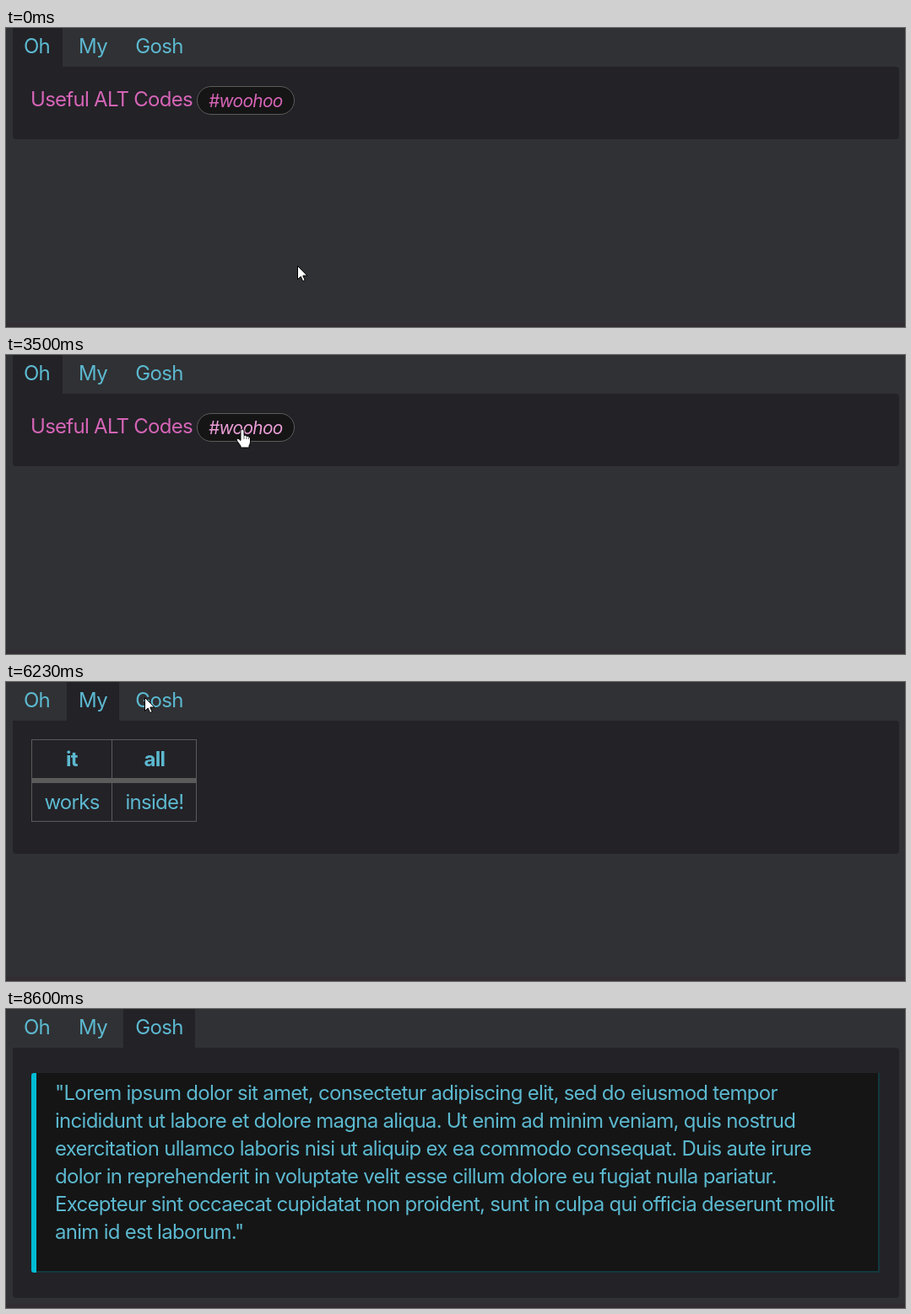
Animation of 1065x355 px, one loop 9.16 s. Source, as an HTML page:

```html
<!DOCTYPE html>
<html lang="en">
<head>
<meta charset="utf-8">
<title>Tabs demo</title>
<style>
  :root {
    --page: #303134; --panel: #232227; --ink: #5cb9d0; --link: #d665b7;
    --lit: #eb9fd8; --line: #5b5b5b; --dark: #151515;
  }
  html, body { margin: 0; width: 100%; height: 100%; overflow: hidden; background: var(--page); }
  body {
    position: relative; color: var(--ink);
    font: 400 24px/33px Inter, "Liberation Sans", sans-serif;
    letter-spacing: -.03em; font-optical-sizing: none; white-space: nowrap;
  }
  body * { box-sizing: border-box; }
  .box, .text, .tab, .scene, .popup, .cursor, .cursor svg { position: absolute; }
  .scene { inset: 0; }
  .strip { left: 0; right: 0; top: 350px; bottom: 0; background: #322c33; }

  .tab { top: 5px; text-align: center; }
  .active { top: 0; height: 47px; background: var(--panel); }
  .oh { left: 8px; width: 59px; }
  .tab.oh { left: 7px; }
  .my { left: 72px; width: 62px; }
  .gosh { left: 139px; width: 85px; }
  .panel { left: 8px; width: 1050px; top: 46px; background: var(--panel); border-radius: 0 4px 4px 4px; }

  .link { left: 29px; top: 68px; color: var(--link); }
  .tag {
    left: 226px; top: 69px; width: 116px; height: 34px; padding-left: 13px;
    border: 1px solid var(--line); border-radius: 17px; background: var(--dark);
    color: var(--link); font-size: 20.8px; font-style: italic; letter-spacing: -.03em;
  }
  .hover { color: var(--lit); }

  .grid { left: 30px; top: 68px; width: 196px; height: 98px; border: 1px solid var(--line); }
  .rule { left: 30px; top: 114px; width: 196px; height: 6px; background: var(--line); }
  .split { left: 125px; top: 68px; width: 1px; height: 98px; background: var(--line); }
  .cell { text-align: center; }
  .a { left: 30px; width: 96px; }
  .b { left: 126px; width: 100px; }
  .head { top: 75px; font-weight: 700; }
  .data { top: 126px; }

  .quote {
    left: 30px; top: 76px; width: 1005px; height: 237px; background: var(--dark);
    border: solid #12383d; border-width: 0 2px 2px 0; border-radius: 4px 0 0 4px;
  }
  .bar { left: 30px; top: 76px; width: 6px; height: 237px; background: #00bcd4; border-radius: 3px 0 0 3px; }

  .popup {
    left: 137px; top: 128px; width: 600px; height: 420px; overflow: hidden;
    background: var(--page); border: 1px solid var(--line); border-radius: 8px;
    box-shadow: 0 6px 25px rgba(0, 0, 0, .22);
  }
  .popup .text { left: 60px; }
  .title { top: 30px; font-weight: 700; font-size: 42px; line-height: 51px; letter-spacing: -.046em; color: #c5c700; }
  .thumb { left: 569px; top: 1px; width: 15px; height: 136px; border-radius: 8px; background: var(--line); }

  .cursor { left: 0; top: 0; }
  .cursor svg { left: 0; top: 0; width: 1px; height: 1px; overflow: visible; }
  .cursor path { fill: #fff; stroke: #000; stroke-width: 1; stroke-linejoin: round; }
</style>
</head>
<body>
  <div class="box strip"></div>

  <section class="scene">
    <div class="box active oh"></div>
    <div class="box panel" style="height:86px"></div>
    <div class="text link">Useful ALT Codes</div>
    <div class="box tag">#woohoo</div>
  </section>

  <section class="scene" hidden>
    <div class="box active my"></div>
    <div class="box panel" style="height:158px"></div>
    <div class="box grid"></div>
    <div class="box split"></div>
    <div class="box rule"></div>
    <div class="text cell head a">it</div>
    <div class="text cell head b">all</div>
    <div class="text cell data a">works</div>
    <div class="text cell data b">inside!</div>
  </section>

  <section class="scene" hidden>
    <div class="box active gosh"></div>
    <div class="box panel" style="height:297px"></div>
    <div class="box quote"></div>
    <div class="box bar"></div>
    <div class="text" style="left:58px;top:83px">
      "Lorem ipsum dolor sit amet, consectetur adipiscing elit, sed do eiusmod tempor<br>
      incididunt ut labore et dolore magna aliqua. Ut enim ad minim veniam, quis nostrud<br>
      exercitation ullamco laboris nisi ut aliquip ex ea commodo consequat. Duis aute irure<br>
      dolor in reprehenderit in voluptate velit esse cillum dolore eu fugiat nulla pariatur.<br>
      Excepteur sint occaecat cupidatat non proident, sunt in culpa qui officia deserunt mollit<br>
      anim id est laborum."
    </div>
  </section>

  <div class="tab oh">Oh</div>
  <div class="tab my">My</div>
  <div class="tab gosh">Gosh</div>

  <div class="popup">
    <div class="text title">Useful ALT Codes</div>
    <div class="text" style="top:105px">
      Symbols and typography that can be input<br>
      using the ALT code paradigm. Entry is<br>
      performed through a combination of holding<br>
      Left ALT on the keyboard, then entering a
    </div>
    <div class="box thumb"></div>
  </div>

  <div class="cursor">
    <svg class="arrow"><path d="M.5 .5V16.5L4.2 13L6.7 18.6L9.2 17.5L6.8 12H11.8Z"/></svg>
    <svg class="hand">
      <path d="M-2 2a2 2 0 0 1 4 0V7.5q2-.8 3 .8q2-.6 2.6 1q1.9-.3 1.9 1.7V15q0 2.5-1.5 4.5V22H-2V20L-6.3 14q-1.2-2 .6-2.8q1.5-.3 3.7 2.3Z"/>
      <path d="M2 8v4M5 9v3M7.5 10v2" style="stroke-width:.6"/>
    </svg>
  </div>

<script>
  const LOOP = 9160;
  const $ = selector => document.querySelector(selector);
  const scenes = document.querySelectorAll('.scene');
  const [link, tag, popup, cursor, arrow, hand] =
    ['.link', '.tag', '.popup', '.cursor', '.arrow', '.hand'].map($);

  const progress = (t, from, to) => Math.min(1, Math.max(0, (t - from) / (to - from)));
  const smooth = k => k * k * (3 - 2 * k);
  const within = (x, y, left, top, right, bottom) => x >= left && x < right && y >= top && y < bottom;

  const start = { x: 345, y: 282 };
  // Where the pointer goes; sway bends the way there into an S.
  const glides = [
    { from: 330, to: 1000, x: 146, y: 85 },
    { from: 1270, to: 1630, x: 160, y: 162 },
    { from: 2130, to: 2330, x: 83, y: 171 },
    { from: 2370, to: 2930, x: 280, y: 88, sway: 70 },
    { from: 3500, to: 3630, x: 190, y: 160 },
    { from: 3870, to: 4100, x: 103, y: 34 },
    { from: 4970, to: 5530, x: 133, y: 141, sway: -45 },
    { from: 5570, to: 5670, x: 135, y: 114 },
    { from: 5970, to: 6230, x: 164, y: 18 }
  ];

  function pointer(t) {
    let { x, y } = start;
    for (const glide of glides) {
      const k = smooth(progress(t, glide.from, glide.to));
      x += (glide.x - x) * k + (glide.sway || 0) * Math.sin(2 * Math.PI * k);
      y += (glide.y - y) * k;
    }
    // Two widening turns that sink below the stage.
    const u = progress(t, 6870, 8600), angle = 4 * Math.PI * u;
    x += 110 * u + (110 + 90 * u) * Math.sin(angle);
    y += 352 * u * u + 60 * (1 - Math.cos(angle));
    return [x, y];
  }

  function draw(t) {
    const page = (t >= 4470) + (t >= 6630);
    scenes.forEach((scene, i) => scene.hidden = i !== page);
    popup.style.opacity = t < 2560 ? progress(t, 1290, 1400) : 0;

    const [x, y] = pointer(t);
    const onLink = page === 0 && within(x, y, 30, 71, 220, 98);
    const onTag = page === 0 && within(x, y, 226, 69, 342, 103);
    link.classList.toggle('hover', onLink);
    tag.classList.toggle('hover', onTag);
    hand.style.display = onLink || onTag ? 'block' : 'none';
    arrow.style.display = onLink || onTag ? 'none' : 'block';
    cursor.style.transform = `translate(${Math.round(x)}px, ${Math.round(y)}px)`;
  }

  function frame() {
    draw(performance.now() % LOOP);
    requestAnimationFrame(frame);
  }
  frame();
</script>
</body>
</html>
```
